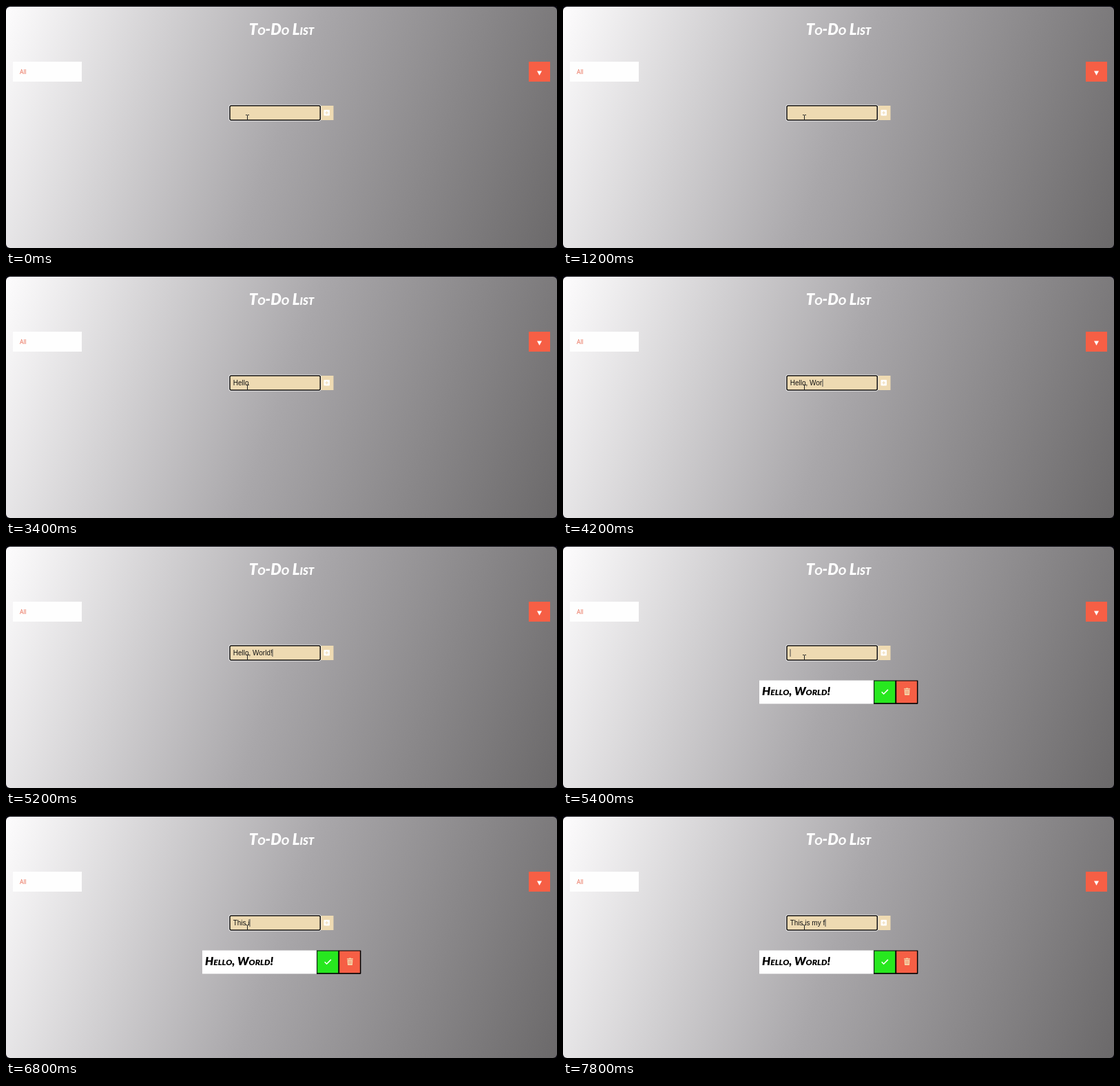
An HTML page that plays this animation: 800 by 352 pixels, repeating every 8000 ms.

```html
<!DOCTYPE html>
<html lang="en">
<head>
<meta charset="utf-8">
<title>To-Do List</title>
<style>
  html, body { margin: 0; width: 100%; height: 100%; overflow: hidden; background: #08070f; }
  #page {
    position: absolute; left: 0; top: 1px; width: 800px; height: 351px; border-radius: 6px;
    background: linear-gradient(110deg, #fdfcfd, #a9a7aa 50%, #6b696a);
  }
  svg { position: absolute; left: 0; top: 0; }
  .display { font: italic 900 22px Lato, sans-serif; font-variant: small-caps; }
  .task { font-size: 17px; }
  .filter { font: 8.5px "Open Sans", sans-serif; }
  #entry { font: 10px "Liberation Sans", Arial, sans-serif; white-space: pre; }
</style>
</head>
<body>
<div id="page"></div>
<svg width="800" height="352" viewBox="0 0 800 352">
  <text class="display" x="400" y="42" text-anchor="middle" fill="#fff">To-Do List</text>

  <rect x="10" y="81" width="100" height="29" fill="#fefefe"/>
  <text class="filter" x="20" y="98.5" fill="#e8644c">All</text>
  <rect x="759" y="81" width="31" height="29" fill="#f65f45"/>
  <path d="M771 94.5h7l-3.5 6.5z" fill="#fff"/>

  <rect x="457" y="145" width="18.5" height="21" fill="#eedab2"/>
  <rect x="461.5" y="151" width="8.5" height="8.5" rx="1" fill="#fff"/>
  <path d="M465.75 152.8v5M463.25 155.3h5" stroke="#eedab2"/>
  <rect x="323.5" y="143.5" width="134" height="24" rx="3" fill="#fff"/>
  <rect x="325" y="145" width="131.3" height="21" rx="2" fill="#eedab2" stroke="#0c0b0c" stroke-width="1.5"/>
  <text id="entry" x="329.7" y="159" fill="#111"></text>
  <rect id="caret" y="150" width="1" height="11" fill="#444"/>
  <path d="M348 158.5h1.8l.7.6.7-.6h1.8M350.5 159v7" fill="none" stroke="#222"/>

  <g id="item">
    <rect x="285" y="195.5" width="166" height="34" fill="#fff"/>
    <text class="display task" x="289" y="217" fill="#000">Hello, World!</text>
    <g stroke-width="1.3">
      <rect x="451.6" y="196" width="31.4" height="33" fill="#27e81f" stroke="#16301a"/>
      <rect x="483.6" y="196" width="31" height="33" fill="#f65f45" stroke="#2c1714"/>
    </g>
    <path d="M451 229.2h64M483.2 196v33M514.6 196v33" stroke="#000" stroke-width="1.3"/>
    <path d="M462.7 212.3l2.9 2.9 6.3-6.3" fill="none" stroke="#fff" stroke-width="1.6"/>
    <path d="M495 207.3h2.6l.6-.8h2.6l.6.8h2.6v1.3h-9zM495.6 209.3h7.8l-.5 7.7h-6.8z" fill="#f3dcae"/>
    <path d="M497.7 210.5v5M499.5 210.5v5M501.3 210.5v5" stroke="#f65f45" stroke-width=".6"/>
  </g>
</svg>
<script>
  const LOOP = 8000, ADDED = 5400;
  const first = "Hello, World!", second = "This is my f";
  // [start in ms, typed text, caret visible]
  const steps = [
    [0, "", false],
    [1400, "", true],
    ...[1, 2, 3, 4, 5].map((n, i) => [1800 + i * 200, first.slice(0, n), true]),
    [3200, "Hello", false],
    ...[6, 7, 8, 10, 11, 12, 13].map((n, i) => [3600 + i * 200, first.slice(0, n), true]),
    [ADDED, "", true],
    [6000, "", false],
    ...[1, 2, 4, 6, 7, 8, 9, 11, 12].map((n, i) => [6200 + i * 200, second.slice(0, n), true])
  ];
  const [entry, caret, item] = ["entry", "caret", "item"].map(id => document.getElementById(id));
  const show = (node, on) => node.setAttribute("visibility", on ? "visible" : "hidden");

  function draw(now) {
    const t = now % LOOP;
    const [, text, caretOn] = steps.filter(step => step[0] <= t).pop();
    if (entry.textContent !== text) entry.textContent = text;
    const width = text ? entry.getComputedTextLength() : 0;
    caret.setAttribute("x", 329.5 + Math.round(width));
    show(caret, caretOn);
    show(item, t >= ADDED);
    requestAnimationFrame(draw);
  }
  draw(0);
</script>
</body>
</html>
```
